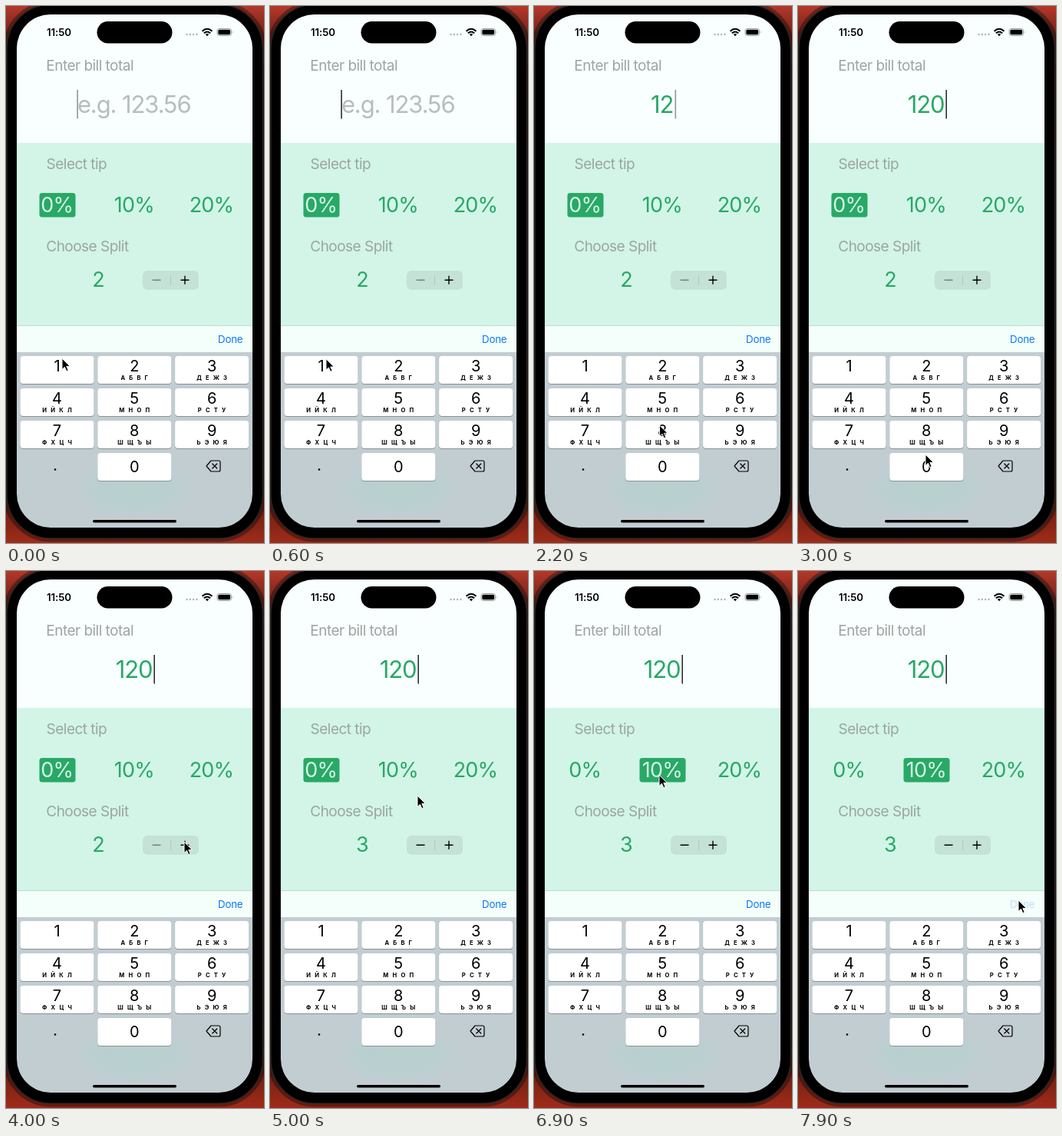
An HTML page that plays this animation: 336 px wide and 698 px high, repeating every 8 s.

```html
<!DOCTYPE html>
<html lang="en">
<head>
<meta charset="utf-8">
<style>
html, body { margin: 0; width: 100%; height: 100%; overflow: hidden; background: #000; }
svg { display: block; width: 336px; height: 698px; font-family: Inter, "Liberation Sans", sans-serif; }
.label { font-size: 19px; letter-spacing: -.52px; fill: #9ca5a1; }
.big { font-size: 31px; letter-spacing: -1.1px; text-anchor: middle; }
.mid { font-size: 27px; letter-spacing: -.8px; text-anchor: middle; fill: #29a866; }
.digit { font-size: 20px; text-anchor: middle; }
.letters { font-size: 7.6px; font-weight: 700; letter-spacing: 1.7px; text-anchor: middle; }
.line { fill: none; stroke: #000; stroke-width: 1.4; stroke-linecap: round; stroke-linejoin: round; }
</style>
</head>
<body>
<svg viewBox="0 0 336 698">
  <defs>
    <linearGradient id="wall" x2="0" y2="1">
      <stop stop-color="#b5382a"/><stop offset=".06" stop-color="#6a2018"/>
      <stop offset=".15" stop-color="#2a100d"/><stop offset=".85" stop-color="#2c0f0b"/>
      <stop offset=".95" stop-color="#7a2214"/><stop offset="1" stop-color="#a02c1a"/>
    </linearGradient>
    <radialGradient id="glow">
      <stop stop-color="#b7d0ce"/><stop offset=".55" stop-color="#bacfd0"/>
      <stop offset="1" stop-color="#c2cdd2" stop-opacity="0"/>
    </radialGradient>
    <clipPath id="screen"><rect x="14" y="11" width="307" height="667" rx="44"/></clipPath>
  </defs>
  <rect width="336" height="698" fill="url(#wall)"/>
  <rect x="1" y="-2" width="333.500" height="694" rx="57" stroke="#000" stroke-opacity=".35" stroke-width="9"/>
  <rect x="1" y="-2" width="333.500" height="694" rx="57" stroke="#2b2625" stroke-width="1.600"/>

  <g clip-path="url(#screen)">
    <rect x="14" y="11" width="307" height="168" fill="#f8fffe"/>
    <rect x="14" y="178" width="307" height="238" fill="#d2f5e7"/>
    <rect x="14" y="415" width="307" height="35" fill="#f4fefa"/>
    <path d="M14 415.5H321" stroke="#c3ddd4"/>
    <rect x="14" y="450" width="307" height="228" fill="#c2cdd2"/>
    <ellipse cx="167" cy="628" rx="98" ry="46" fill="url(#glow)"/>
  </g>

  <text x="53" y="38.6" font-size="13.3" font-weight="600" letter-spacing="-.1">11:50</text>
  <rect x="118.500" y="20" width="98" height="28.500" rx="14.250"/>
  <g fill="#b4b9b8">
    <circle cx="235.500" cy="37" r="1.300"/><circle cx="239.800" cy="37" r="1.300"/>
    <circle cx="244.100" cy="37" r="1.300"/><circle cx="248.400" cy="37" r="1.300"/>
  </g>
  <path class="line" style="stroke-width:1.9;stroke-linecap:butt" d="M255.500 32.700Q262 27 268.500 32.700M257.800 35.200Q262 31.700 266.200 35.200"/>
  <path d="M259.700 36.800Q262 35 264.300 36.800L262 39.200Z"/>
  <rect x="275" y="29.500" width="18.500" height="9" rx="2.800" fill="none" stroke="#8c9290" stroke-width=".9"/>
  <rect x="276.300" y="30.800" width="15.900" height="6.400" rx="1.600"/>
  <path d="M294.800 32.500Q296.400 34 294.800 35.600Z" fill="#8c9290"/>

  <text class="label" x="52.300" y="83.700">Enter bill total</text>
  <text class="label" x="52.600" y="212">Select tip</text>
  <text class="label" x="52.300" y="318.500">Choose Split</text>
  <text id="bill" class="big" x="166.700" y="139.300"/>
  <rect id="caret" y="109" width="1.600" height="37.500" fill="#26322d"/>

  <rect id="chosen" y="243" height="31.500" rx="3.500" fill="#29a866"/>
  <g id="tips"></g>
  <text id="split" class="mid" x="120" y="365"/>
  <rect x="178" y="344" width="73" height="24.800" rx="6" fill="#c4e2d6"/>
  <path d="M214.500 350V363" stroke="#a9c6ba" stroke-width=".8"/>
  <path id="minus" class="line" d="M191 356.300H201"/>
  <path class="line" d="M228 356.300H238M233 351.300V361.300"/>
  <text id="done" x="308.300" y="437.800" font-size="13.3" letter-spacing="-.25" text-anchor="end" fill="#0a78f5">Done</text>

  <g id="keys"></g>
  <circle cx="64" cy="602.500" r="1.300"/>
  <path class="line" style="stroke-width:1.2" d="M267 591H277Q279 591 279 593V603Q279 605 277 605H267L261 598ZM268.800 595L274.800 601M274.800 595L268.800 601"/>
  <rect x="113" y="668" width="109" height="3.600" rx="1.800"/>

  <path id="pointer" d="M0 0V14.500L3.400 11.300L5.800 16.700L8.200 15.600L5.800 10.400H10.400Z" stroke="#fff" stroke-width="1"/>
</svg>
<script>
const $ = id => document.getElementById(id);
const PERIOD = 8000, STEP = 100;
const typedAt = [-500, 1000, 1700, 2600];
const caretX = [92.3, 174, 183.5, 192.4];
const tips = [["0%", 66.2, 43.5, 47], ["10%", 166.8, 137.5, 60], ["20%", 267.5, 0, 0]];
const letters = ["", "АБВГ", "ДЕЖЗ", "ИЙКЛ", "МНОП", "РСТУ", "ФХЦЧ", "ШЩЪЫ", "ЬЭЮЯ"];

// Pointer stops: time, x, y
const path = [
  [0, 73, 458], [1000, 73, 459], [1400, 149, 471], [1600, 158, 474], [1900, 159, 475],
  [2400, 166, 583], [3100, 166, 583], [3800, 232, 352], [4500, 232, 352],
  [5000, 192, 292], [6000, 233, 250], [6500, 163, 265], [6950, 163, 265],
  [7600, 287, 428], [8000, 287, 428]
];

$("tips").innerHTML = tips.map(([label, x]) => `<text class="mid" x="${x}" y="268">${label}</text>`).join("");

// A key without letters centres its digit
function key(digit, col, row, sub, drop = 0) {
  const x = 18.5 + col * 100.8, y = 455 + row * 42, mid = x + 48;
  return `<rect x="${x}" y="${y + 1}" width="96" height="36" rx="4" fill="#899196"/>
    <rect x="${x}" y="${y}" width="96" height="36" rx="4" fill="#fff"/>
    <text class="digit" x="${mid}" y="${y + 19.7 + drop}">${digit}</text>
    <text class="letters" x="${mid + .8}" y="${y + 30.7}">${[...sub].join(" ")}</text>`;
}
$("keys").innerHTML = letters.map((sub, i) => key(i + 1, i % 3, Math.floor(i / 3), sub)).join("") + key(0, 1, 3, "", 5);

const set = (id, attrs) => Object.entries(attrs).forEach(([k, v]) => $(id).setAttribute(k, v));
const clamp = v => Math.min(1, Math.max(0, v));

function pointerAt(t) {
  const i = path.findIndex(p => p[0] > t);
  const [t0, x0, y0] = path[i - 1], [t1, x1, y1] = path[i];
  const u = (t - t0) / (t1 - t0), e = u * u * (3 - 2 * u);
  return [x0 + (x1 - x0) * e, y0 + (y1 - y0) * e];
}

function draw(t) {
  const count = typedAt.filter(at => at <= t).length - 1;
  $("bill").textContent = count ? "120".slice(0, count) : "e.g. 123.56";
  set("bill", { fill: count ? "#29a866" : "#b8bdbb" });

  const blink = (t - typedAt[count]) % 1000;
  set("caret", { x: caretX[count], opacity: clamp((Math.abs(blink - 700) - 100) / 200) });

  const tip = t < 6700 ? 0 : 1;
  set("chosen", { x: tips[tip][2], width: tips[tip][3] });
  [...$("tips").children].forEach((el, i) => { el.style.fill = i === tip ? "#d2f5e7" : "#29a866"; });

  const split = t < 4200 ? 2 : 3;
  $("split").textContent = split;
  set("minus", { opacity: split > 2 ? 1 : .42 });
  set("done", { opacity: t < 7800 ? 1 : .22 });
  set("pointer", { transform: `translate(${pointerAt(t)})` });
}

function tick() {
  draw(Math.floor(performance.now() % PERIOD / STEP) * STEP);
  requestAnimationFrame(tick);
}
tick();
</script>
</body>
</html>
```
